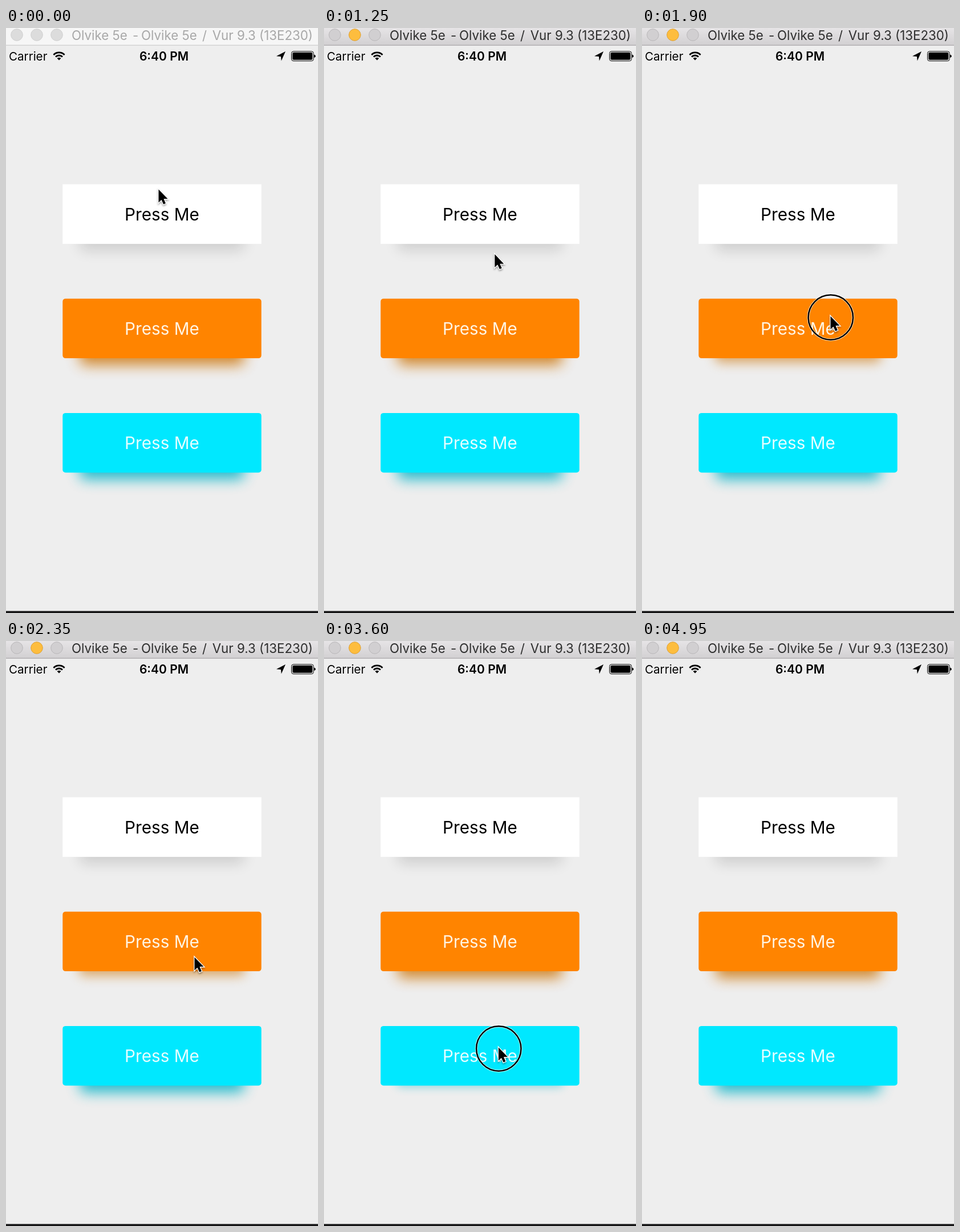
An HTML page that plays this animation: 547x1024 px, repeating every 5050 ms.

```html
<!DOCTYPE html>
<html lang="en">
<head>
<meta charset="utf-8">
<title>Button press</title>
<style>
  html, body { margin: 0; width: 100%; height: 100%; overflow: hidden; background: #eee; }
  svg { display: block; width: 100%; height: 100%; }
  text { font-family: Inter, Roboto, sans-serif; white-space: pre; }
  .label { font-size: 29.7px; text-anchor: middle; }
  .title { font-size: 22.3px; }
</style>
</head>
<body>
<svg viewBox="0 0 547 1024" preserveAspectRatio="none">
  <defs>
    <linearGradient id="bar" x2="0" y2="1">
      <stop stop-color="#e6e4e6"/><stop offset="1" stop-color="#d2d0d2"/>
    </linearGradient>
  </defs>
  <rect width="547" height="1024" fill="#eee"/>

  <rect id="titleBar" width="547" height="30"/>
  <rect id="titleEdge" y="29.5" width="547" height="1.5"/>
  <g id="lights" stroke-width="1">
    <circle cx="19" cy="12" r="10.3"/>
    <circle cx="54" cy="12" r="10.3"/>
    <circle cx="89" cy="12" r="10.3"/>
  </g>
  <g id="title" class="title">
    <text x="115" y="21">Olvike 5e</text>
    <text x="222" y="21">-</text>
    <text x="237" y="21">Olvike 5e</text>
    <text x="344" y="21">/</text>
    <text x="538" y="21" text-anchor="end">Vur 9.3 (13E230)</text>
  </g>

  <text x="5" y="56.7" font-size="20.6">Carrier</text>
  <g transform="translate(93 56.5)">
    <path d="M-9.6-9.6A13.6 13.6 0 0 1 9.6-9.6M-6-6A8.5 8.5 0 0 1 6-6" fill="none" stroke="#000" stroke-width="2.8"/>
    <path d="M0 0L-3.4-3.4A4.8 4.8 0 0 1 3.4-3.4Z"/>
  </g>
  <text x="277" y="56.7" font-size="21" font-weight="600" text-anchor="middle">6:40 PM</text>
  <path d="M490 41L474 49.3L482 50L482.7 57.5Z"/>
  <rect x="500.5" y="40.9" width="38.7" height="16.8" rx="3.5" fill="none" stroke="#000"/>
  <rect x="502.3" y="42.8" width="35" height="13" rx="2"/>
  <path d="M540.2 46.5Q542.8 47 542.8 49.3T540.2 52Z"/>

  <g id="buttons"></g>
  <rect y="1020.5" width="547" height="4" fill="#151516"/>

  <g id="ring" fill="none">
    <circle r="39.2" stroke="#fff" stroke-opacity=".7" stroke-width="4.4"/>
    <circle r="39.2" stroke="#000" stroke-width="2.5"/>
  </g>
  <path id="cursor" d="M0 0V23L5 18.3L8.6 26L12.4 24.4L9 16.6H16Z" stroke="#fff" stroke-width="2.6"
    paint-order="stroke" style="filter: drop-shadow(0 2px 1.5px rgba(0,0,0,.35))"/>
</svg>
<script>
const LOOP = 5050, STEP = 50, ACTIVATE = 400, LEAVE = 4250;
const LEFT = 99.3, WIDTH = 348.4, HEIGHT = 104.4;
const $ = id => document.getElementById(id);
const ramp = u => { u = Math.min(1, Math.max(0, u)); return u * u * (3 - 2 * u); };

const buttons = [
  { y: 273.5, r: 0, fill: '#fff', ink: '#000', shade: '#000', alpha: .13, down: 400, up: 1000 },
  { y: 473.7, r: 5, fill: '#ff8400', ink: '#fff4e2', shade: '#cc7408', alpha: .84, down: 1800, up: 2200 },
  { y: 673.9, r: 5, fill: '#00e8ff', ink: '#e6fdff', shade: '#00b2c6', alpha: .84, down: 2950, up: 3700 }
];

// time, x, y of the pointer tip
const path = [
  [0, 267.5, 282.5], [400, 277, 318.5], [1050, 277, 318.5], [1500, 330.5, 504.5], [2200, 330.5, 504.5],
  [2350, 330.5, 553.5], [2750, 306, 711.5], [3900, 306, 711.5], [4250, 316, 848], [LOOP, 316, 848]
];

$('buttons').innerHTML = buttons.map(b => `
  <rect class="shadow" rx="8" fill="${b.shade}"/>
  <rect x="${LEFT}" y="${b.y}" width="${WIDTH}" height="${HEIGHT}" rx="${b.r}" fill="${b.fill}"/>
  <text class="label" x="273.5" y="${b.y + 63}" fill="${b.ink}">Press Me</text>`).join('');
const shadows = document.querySelectorAll('.shadow');

function set(el, attrs) {
  for (const k in attrs) el.setAttribute(k, attrs[k]);
}

function pointer(t) {
  const i = path.findIndex(p => p[0] > t);
  const a = path[i - 1], b = path[i], u = ramp((t - a[0]) / (b[0] - a[0]));
  return [a[1] + (b[1] - a[1]) * u, a[2] + (b[2] - a[2]) * u];
}

function drawShadow(b, el, t) {
  const p = ramp((t - b.down) / 200) * (1 - ramp((t - b.up) / 300));
  const inset = 30 - 2 * p;
  set(el, {
    x: LEFT + inset, y: b.y + 30, width: WIDTH - 2 * inset, height: 86 - 8.5 * p,
    opacity: b.alpha * (1 - .55 * p)
  });
  el.style.filter = `blur(${12.5 - 5 * p}px)`;
}

function drawTitle(active) {
  $('titleBar').setAttribute('fill', active ? 'url(#bar)' : '#f6f6f6');
  $('titleEdge').setAttribute('fill', active ? '#b3b1b3' : '#d3d3d3');
  $('title').setAttribute('fill', active ? '#2e2e2e' : '#a8a8a8');
  [...$('lights').children].forEach((c, i) => {
    const lit = active && i === 1;
    set(c, {
      fill: lit ? '#fdbd3e' : active ? '#d1cfd1' : '#dcdcdc',
      stroke: lit ? '#dfa032' : active ? '#b9b7b9' : '#cfcfcf'
    });
  });
}

function draw(t) {
  const [x, y] = pointer(t);
  drawTitle(t >= ACTIVATE);
  buttons.forEach((b, i) => drawShadow(b, shadows[i], t));
  const held = buttons.some(b => t >= b.down && t < b.up);
  set($('ring'), { transform: `translate(${x + .3} ${y + 2})`, visibility: held ? 'visible' : 'hidden' });
  set($('cursor'), { transform: `translate(${x} ${y})`, visibility: t < LEAVE ? 'visible' : 'hidden' });
}

function tick() {
  draw(Math.floor(performance.now() % LOOP / STEP) * STEP);
  requestAnimationFrame(tick);
}
tick();
</script>
</body>
</html>
```
